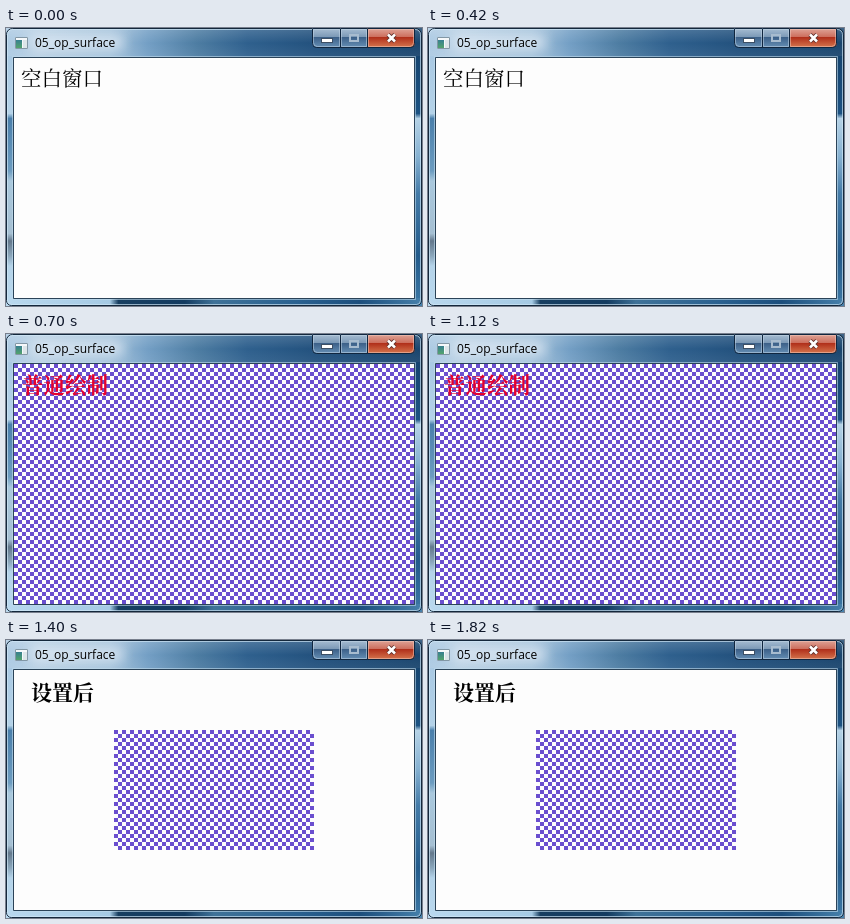
Animation, 416 px wide and 278 px high, one loop 2100 ms. Source, as an HTML page with a canvas:

```html
<!DOCTYPE html>
<html lang="zh">
<head>
<meta charset="utf-8">
<style>
html, body { margin: 0; width: 100%; height: 100%; overflow: hidden; background: #fff }
canvas { display: block }
</style>
</head>
<body>
<canvas id="stage" width="416" height="278"></canvas>
<script>
const ctx = document.getElementById('stage').getContext('2d');
const W = 416, H = 278;

function rect(x, y, w, h, fill) {
  ctx.fillStyle = fill;
  ctx.fillRect(x, y, w, h);
}

function outline(x, y, w, h, color, radius = 0) {
  ctx.strokeStyle = color;
  ctx.beginPath();
  ctx.roundRect(x + .5, y + .5, w - 1, h - 1, radius);
  ctx.stroke();
}

// Linear gradient from (x0,y0) to (x1,y1); stops are [offset, color] pairs
function gradient(x0, y0, x1, y1, ...stops) {
  const g = ctx.createLinearGradient(x0, y0, x1, y1);
  stops.forEach(([at, color]) => g.addColorStop(at, color));
  return g;
}

function text(str, x, y, font, color) {
  ctx.font = font;
  ctx.fillStyle = color;
  ctx.fillText(str, x, y);
}

function button(x, w, radii, stops, edge) {
  ctx.fillStyle = gradient(0, 0, 0, 19, ...stops);
  ctx.beginPath();
  ctx.roundRect(x, 0, w, 19, radii);
  ctx.fill();
  outline(x, 0, w, 20, '#10263f', radii);
  outline(x + 1, 1, w - 2, 18, edge, radii);
}

function drawButtons() {
  const glass = [[0, '#a9bfd4'], [.46, '#7d9ab7'], [.5, '#3d6189'], [1, '#648db3']];
  const red = [[0, '#e0a79b'], [.46, '#cd6f5e'], [.5, '#b1301b'], [1, '#d4734c']];
  button(306, 29, [0, 0, 0, 4], glass, '#c3d6e788');
  button(334, 28, 0, glass, '#c3d6e788');
  button(361, 48, [0, 0, 4, 0], red, '#f0c8bb88');
  rect(315, 10, 12, 5, '#3c4f65');
  rect(316, 11, 10, 3, '#fff');
  ctx.lineWidth = 2;
  ctx.strokeStyle = '#a8bccf';
  ctx.strokeRect(344, 7, 8, 6);
  for (const [color, width] of [['#5e302c', 4.5], ['#fff', 2.6]]) {
    ctx.strokeStyle = color;
    ctx.lineWidth = width;
    ctx.beginPath();
    ctx.moveTo(382, 6.5); ctx.lineTo(389, 13.5);
    ctx.moveTo(389, 6.5); ctx.lineTo(382, 13.5);
    ctx.stroke();
  }
  ctx.lineWidth = 1;
}

function drawWindow() {
  rect(0, 0, W, H, '#174770');
  rect(0, 0, W, 30, gradient(0, 0, W, 0, [0, '#a9c8e2'], [.08, '#b4cde2'], [.25, '#9fbfd9'],
    [.34, '#6f9cc3'], [.46, '#47789f'], [.58, '#285b8a'], [.75, '#1b4b79'], [1, '#123f69']));
  rect(0, 0, W, 30, gradient(0, 0, 0, 30, [0, '#ffffff30'], [.5, '#ffffff08'], [1, '#ffffff18']));
  rect(0, 28, 8, 250, gradient(0, 28, 0, 278, [0, '#a9c9e3'], [.23, '#b4d2e8'], [.25, '#4a7fab'],
    [.46, '#6c9cc0'], [.5, '#a9c8dd'], [.71, '#a5bfd2'], [.74, '#63788c'], [.8, '#8ba7bc'], [.84, '#b4d3e9'], [1, '#b9d8ee']));
  rect(408, 28, 8, 250, gradient(0, 28, 0, 278, [0, '#164570'], [.23, '#1c5282'], [.25, '#b5d2e6'],
    [.4, '#87b2d2'], [.55, '#447ba8'], [.8, '#235b8b'], [1, '#3d78a5']));
  rect(0, 270, W, 8, gradient(0, 0, W, 0, [0, '#b9d8ee'], [.25, '#a5cae4'], [.27, '#173e60'],
    [.43, '#133b60'], [.5, '#3f7298'], [.7, '#2a6190'], [.85, '#1c4e7c'], [1, '#4680ab']));

  // Soft halo behind the title
  ctx.filter = 'blur(6px)';
  rect(24, 8, 94, 13, '#e8f1f9bb');
  ctx.filter = 'none';

  outline(0, 0, W, H, '#14283c', [6, 6, 5, 5]);
  outline(1, 1, W - 2, H - 2, '#d3e9f8aa', [5, 5, 4, 4]);
  outline(6, 28, 404, 244, '#c2dced99');
  outline(7, 29, 402, 242, '#2b4358');

  rect(9, 9, 13, 12, '#f5f8fa');
  outline(9, 9, 13, 12, '#8297a5');
  rect(10, 12, 6, 8, gradient(0, 12, 0, 20, [0, '#377f91'], [1, '#53a36c']));
  rect(17, 12, 4, 8, '#dce5e9');
  text('05_op_surface', 29, 19, '12px "Open Sans", "Noto Sans", sans-serif', '#000');
  drawButtons();
  rect(8, 30, 400, 240, '#fdfdfd');
}

function checker(x, y, w, h) {
  for (let row = 0; row < h / 4; row++)
    for (let col = row % 2; col < w / 4; col += 2)
      rect(x + col * 4, y + row * 4, 4, 4, '#6a4fcf');
}

const serif = '"Noto Serif CJK SC", "Noto Sans CJK SC", "Noto Sans CJK", serif';
const scenes = [
  () => text('空白窗口', 15, 58, `300 20.5px ${serif}`, '#000'),
  () => {
    checker(8, 30, 400, 240);
    text('普通绘制', 16, 59, `bold 21.5px ${serif}`, '#e6002d');
  },
  () => {
    text('设置后', 25, 60, `bold 21px ${serif}`, '#000');
    checker(108, 90, 200, 120);
  }
];

const start = performance.now();
let shown = -1;
function frame() {
  const scene = Math.floor((performance.now() - start) % 2100 / 700);
  if (scene !== shown) {
    ctx.clearRect(0, 0, W, H);
    drawWindow();
    scenes[scene]();
    shown = scene;
  }
  requestAnimationFrame(frame);
}
frame();
</script>
</body>
</html>
```
